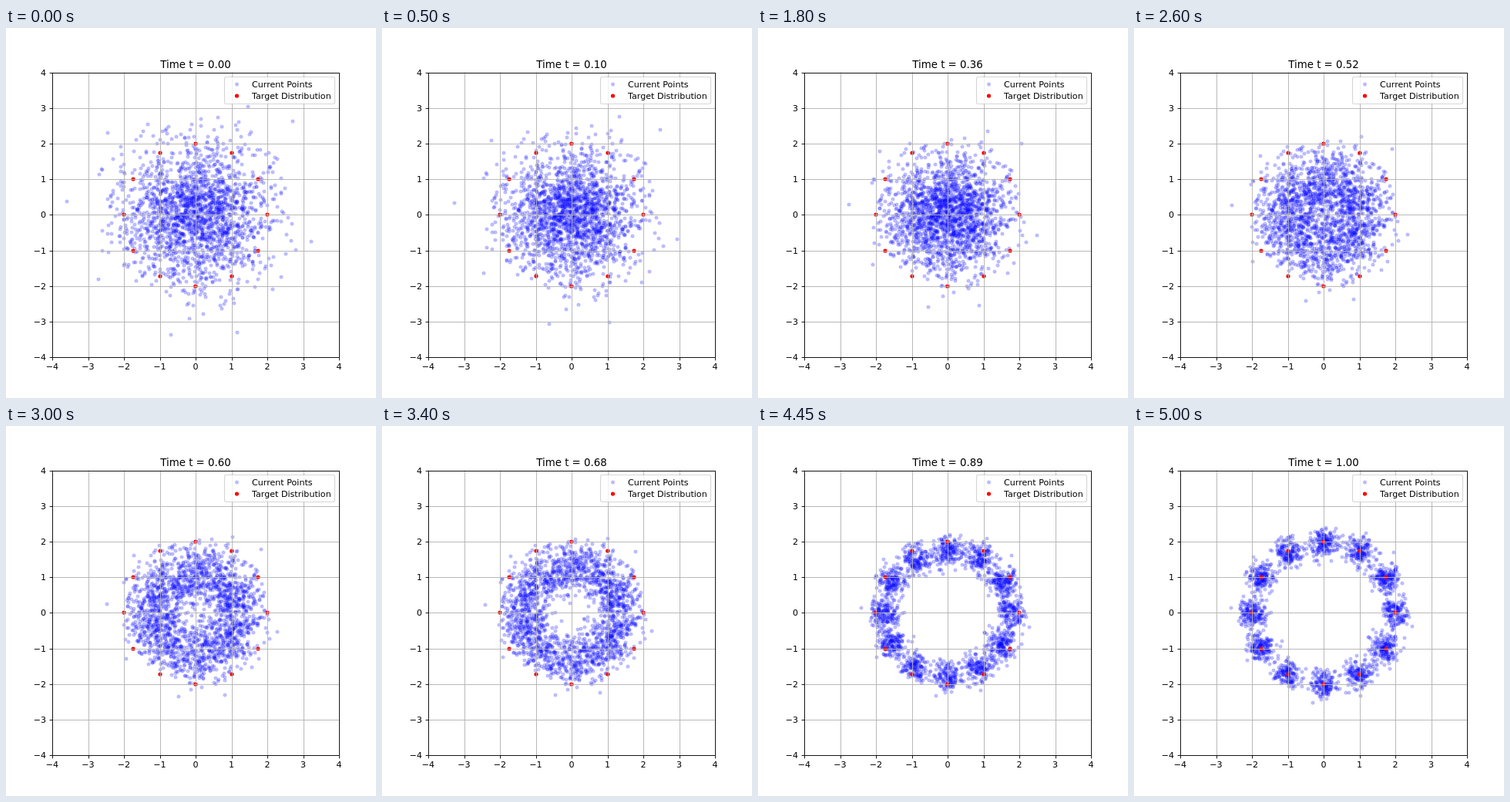
An HTML page with a canvas that plays this animation: 480 px wide and 480 px high, repeating every 5.05 s.

```html
<!DOCTYPE html>
<html lang="en">
<head>
<meta charset="utf-8">
<title>Flow of points</title>
<style>
  html, body { margin: 0; width: 100%; height: 100%; overflow: hidden; background: #fff; }
  canvas, svg { position: absolute; left: 0; top: 0; width: 480px; height: 480px; }
  text { font: 11.11px "DejaVu Sans", sans-serif; fill: #000; }
  .mid { text-anchor: middle; }
  .end { text-anchor: end; }
  #title { font-size: 13.33px; }
</style>
</head>
<body>
<canvas id="dots" width="480" height="480"></canvas>
<svg id="axes" viewBox="0 0 480 480"></svg>
<script>
const start = performance.now();

const STEP_MS = 50, STEPS = 100, COUNT = 2000;
const MODES = 12, RADIUS = 2, SPREAD = 0.2, CORE = 3;
const DOT_RADIUS = 1.76, DOT_EDGE = 1.67;
const BLUE = "#00f", RED = "#f00", BLUE_ALPHA = 0.2;
const toX = x => 246 + 46.5 * x;
const toY = y => 242.4 - 46.2 * y;
const snap = v => Math.floor(v + 0.5) + 0.5;
const toPixel = v => Math.floor(v + 0.5 + 1e-6);
const polar = (r, a) => [r * Math.cos(a), r * Math.sin(a)];

const targets = Array.from({ length: MODES }, (_, k) => polar(RADIUS, 2 * Math.PI * k / MODES));

// The few points that start far outside the cloud
const strays = [[-3.6, 0.37], [2.71, 2.63], [1.46, 3.04], [3.23, -0.75],
  [-0.69, -3.37], [1.16, -3.31], [-2.45, 2.3], [-2.7, -1.8]];

let seed = 20;
function random() {
  seed = (seed + 0x6D2B79F5) | 0;
  let v = Math.imul(seed ^ (seed >>> 15), 1 | seed);
  v = (v + Math.imul(v ^ (v >>> 7), 61 | v)) ^ v;
  return ((v ^ (v >>> 14)) >>> 0) / 4294967296;
}

// Gaussian point, cut off at radius CORE
function gaussian() {
  const share = 1 - Math.exp(-CORE * CORE / 2);
  return polar(Math.sqrt(-2 * Math.log(1 - share * random())), 2 * Math.PI * random());
}

// Exact flow from a unit Gaussian to the ring of small Gaussians
function advance([x, y], t) {
  const variance = (1 - t) ** 2 + (t * SPREAD) ** 2;
  const rate = (t * SPREAD ** 2 - (1 - t)) / variance;
  const peak = Math.hypot(x, y) * RADIUS;
  let sum = 0, mx = 0, my = 0;
  for (const [cx, cy] of targets) {
    const w = Math.exp((x * cx + y * cy - peak) * t / variance);
    sum += w; mx += w * cx; my += w * cy;
  }
  mx /= sum; my /= sum;
  return [x + (mx + rate * (x - t * mx)) / STEPS,
          y + (my + rate * (y - t * my)) / STEPS];
}

const cloud = Array.from({ length: COUNT - strays.length }, gaussian);
const path = [[...strays, ...cloud]];
for (let n = 0; n < STEPS; n++)
  path.push(path[n].map(p => advance(p, n / STEPS)));

// Static axes, grid, labels and legend
const svg = document.getElementById("axes");
function add(tag, attrs, text) {
  const el = document.createElementNS("http://www.w3.org/2000/svg", tag);
  for (const key in attrs) el.setAttribute(key, attrs[key]);
  if (text) el.textContent = text;
  svg.appendChild(el);
  return el;
}
const line = (d, stroke) => add("path", { d, stroke, fill: "none", "stroke-width": 0.89 });
const label = (x, y, text, cls = "") => add("text", { x, y, class: cls }, text);
const legendDot = (cx, cy, color, alpha) => add("circle", { cx, cy, r: DOT_RADIUS,
  fill: color, "fill-opacity": alpha,
  stroke: color, "stroke-opacity": alpha, "stroke-width": DOT_EDGE });

for (let v = -4; v <= 4; v++) {
  const x = snap(toX(v)), y = snap(toY(v));
  line(`M${x} 57.6V427.2M60 ${y}H432`, "#b0b0b0");
}
for (let v = -4; v <= 4; v++) {
  const x = snap(toX(v)), y = snap(toY(v));
  const name = String(v).replace("-", "\u2212");
  line(`M${x} 427.5v3.9M60.5 ${y}h-3.9`, "#000");
  label(toX(v), 443, name, "mid");
  label(52.2, Math.round(toY(v) + 4), name, "end");
}
line("M60.5 58.5H432.5V427.5H60.5Z", "#000");
const title = label(246, 52, "Time t = 0.00", "mid");
title.id = "title";

add("rect", { x: 283.5, y: 63.5, width: 143, height: 35, rx: 2.2, fill: "#fff",
  stroke: "#ccc", "stroke-width": 1.11, opacity: 0.8 });
legendDot(299.5, 73, BLUE, BLUE_ALPHA);
legendDot(299.5, 88, RED, 1);
label(319, 77, "Current Points");
label(319, 92, "Target Distribution");

// Moving points
const ctx = document.getElementById("dots").getContext("2d");
function stamp(color, alpha) {
  const c = document.createElement("canvas");
  c.width = c.height = 8;
  const g = c.getContext("2d");
  g.globalAlpha = alpha;
  g.fillStyle = g.strokeStyle = color;
  g.lineWidth = DOT_EDGE;
  g.arc(4, 4, DOT_RADIUS, 0, 2 * Math.PI);
  g.fill();
  g.stroke();
  return c;
}
const blueDot = stamp(BLUE, BLUE_ALPHA), redDot = stamp(RED, 1);

function scatter(points, mark) {
  for (const [x, y] of points)
    ctx.drawImage(mark, toPixel(toX(x)) - 4, toPixel(toY(y)) - 4);
}

let shown = -1;
function draw() {
  const step = Math.floor((performance.now() - start) / STEP_MS) % (STEPS + 1);
  if (step !== shown) {
    shown = step;
    ctx.clearRect(0, 0, 480, 480);
    scatter(path[step], blueDot);
    scatter(targets, redDot);
    title.textContent = "Time t = " + (step / STEPS).toFixed(2);
  }
  requestAnimationFrame(draw);
}
draw();
</script>
</body>
</html>
```
